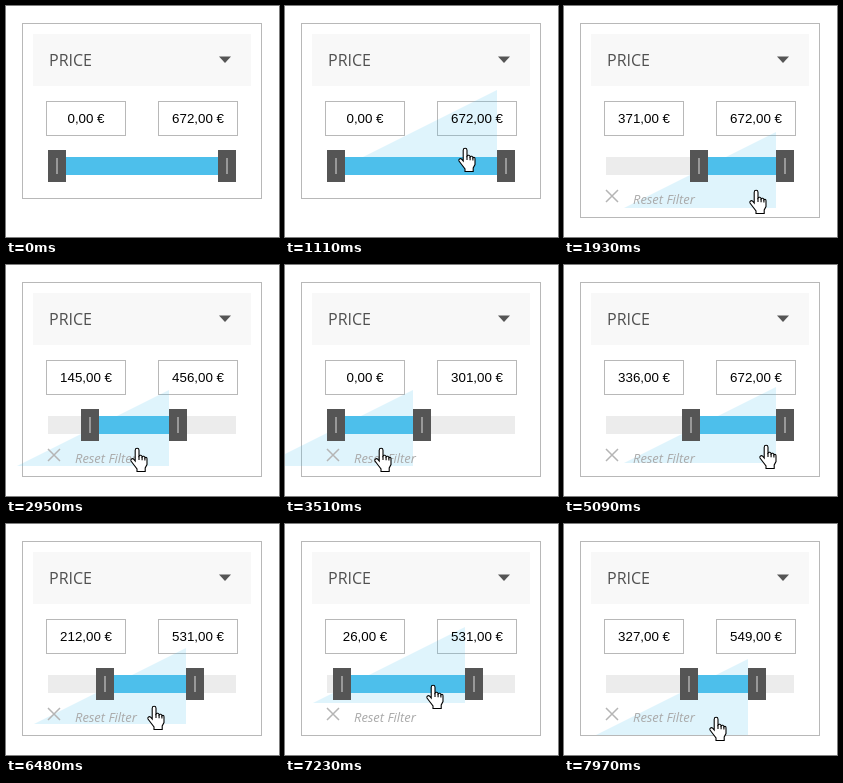
An HTML page with a canvas that plays this animation: 273x231 px, repeating every 8000 ms.

```html
<!DOCTYPE html>
<html lang="en">
<head>
<meta charset="utf-8">
<title>Price slider</title>
<style>
html, body { margin: 0; width: 100%; height: 100%; overflow: hidden; background: #fff; }
canvas { display: block; }
</style>
</head>
<body>
<canvas id="stage" width="273" height="231"></canvas>
<script>
const ctx = document.getElementById('stage').getContext('2d');
const LOOP = 8000, MAX_PRICE = 672;
const TRACK = { left: 42, right: 230, top: 151, bottom: 169 };
const HANDLE = 18, TRAVEL = 152;
const MAX_RIGHT = TRACK.right - HANDLE;
const HOVER_AT = 1010, DRAG_AT = 1290;
const START = { x: 168, y: 236 }, GRAB = { x: 180, y: 142 };

// Pointer moves: start, end, steps, target x, target y, easing power
const moves = [
  [270, 1010, 9, 177, 145, 1],
  [1110, 1110, 1, 180, 142, 1],
  [1290, 1930, 8, 192, 184, 1],
  [2310, 3050, 9, 120, 183, 1.4],
  [3150, 3510, 5, 96, 183, 0.8],
  [3890, 4610, 9, 162, 181, 1],
  [4710, 5090, 5, 202, 180, 1],
  [5360, 6120, 9, 158, 181, 1],
  [6200, 6480, 4, 148, 182, 1],
  [6850, 7230, 5, 148, 161, 1],
  [7510, 7970, 6, 152, 193, 1]
];

const hand = new Path2D('M-1.8 13V2.2a1.9 1.9 0 0 1 3.8 0V8a1.7 1.7 0 0 1 3.1 .8' +
  'a1.6 1.6 0 0 1 2.8 .9a1.3 1.3 0 0 1 2.1 1.2V16.5L8.2 20V23.5H0V21L-3 17L-6 13a1.6 1.6 0 0 1 2.6-1.8L-1.8 13Z');
const knuckles = new Path2D('M2 8V12M5.1 8.8V12.3M7.9 9.7V12.6');
const arrow = new Path2D('M.5 .5V16.5L4.2 13L6.7 18.5L9 17.5L6.6 12.2H11.8Z');

function pointerAt(time) {
  let { x, y } = START;
  for (const [start, end, steps, toX, toY, power] of moves) {
    if (time < start) break;
    const gap = (end - start) / Math.max(1, steps - 1);
    const step = gap ? Math.min(steps, Math.floor((time - start) / gap + 0.15) + 1) : 1;
    const p = (step / steps) ** power;
    x += (toX - x) * p;
    y += (toY - y) * p;
  }
  return { x: Math.round(x), y: Math.round(y) };
}

function rect(color, x, y, w, h) {
  ctx.fillStyle = color;
  ctx.fillRect(x, y, w, h);
}

function outline(x, y, w, h) {
  rect('#fff', x, y, w, h);
  ctx.strokeStyle = '#b8b8b8';
  ctx.lineWidth = 1;
  ctx.strokeRect(x + 0.5, y + 0.5, w - 1, h - 1);
}

function label(text, font, color, x, y, align = 'left') {
  ctx.font = font;
  ctx.fillStyle = color;
  ctx.textAlign = align;
  ctx.fillText(text, x, y);
}

function polygon(color, ...points) {
  ctx.beginPath();
  points.forEach(([x, y]) => ctx.lineTo(x, y));
  ctx.closePath();
  ctx.fillStyle = color;
  ctx.fill();
}

function drawHandle(x) {
  rect('#555', x, 144, HANDLE, 32);
  rect('#999', x + 8, 152, 2, 16);
}

function drawPrice(value, center) {
  label(value + ',00 €', '13.333px "Liberation Sans", Arial, sans-serif', '#000', center, 117, 'center');
}

function drawReset() {
  ctx.strokeStyle = '#b5b5b5';
  ctx.lineWidth = 1.5;
  ctx.stroke(new Path2D('M42 184L54 196M54 184L42 196'));
  label('Reset Filter', 'italic 13px "Open Sans", sans-serif', '#aaa', 69, 197.5);
}

function drawPointer({ x, y }) {
  const isHand = y < 176 || pointerDragging;
  ctx.save();
  ctx.translate(x, y);
  ctx.fillStyle = '#fff';
  ctx.strokeStyle = '#000';
  ctx.lineWidth = 1.1;
  ctx.fill(isHand ? hand : arrow);
  ctx.stroke(isHand ? hand : arrow);
  if (isHand) ctx.stroke(knuckles);
  ctx.restore();
}

let pointerDragging = false;

function draw(time) {
  const pointer = pointerAt(time);
  pointerDragging = time >= DRAG_AT;
  const anchor = pointerDragging ? pointer : GRAB;

  // The wedge's sloped side meets the track's lower edge at the left handle.
  const right = Math.min(MAX_RIGHT, anchor.x + 32);
  const base = anchor.y + 18;
  const span = Math.min(TRAVEL + HANDLE, TRAVEL - 2 * (base - TRACK.bottom));
  const filtered = base > TRACK.bottom || right < MAX_RIGHT;
  const left = filtered ? Math.max(TRACK.left, right - span) : TRACK.left;
  const scale = MAX_PRICE / TRAVEL;

  rect('#fff', 0, 0, 273, 231);
  outline(16, 17, 240, filtered ? 195 : 176);
  rect('#f8f8f8', 27, 28, 218, 52);
  label('PRICE', '16px "Open Sans", sans-serif', '#505050', 43, 60);
  polygon('#555', [213, 50.5], [225, 50.5], [219, 57]);
  outline(40, 95, 80, 35);
  outline(152, 95, 80, 35);

  if (time >= HOVER_AT) {
    polygon('rgba(77,191,235,.18)', [right - TRAVEL, base], [right, base - TRAVEL / 2], [right, base]);
  }

  drawPrice(Math.floor((left - TRACK.left) * scale), 80);
  drawPrice(Math.ceil(MAX_PRICE - (MAX_RIGHT - right) * scale), 192);
  if (filtered) drawReset();

  const height = TRACK.bottom - TRACK.top;
  rect('#ececec', TRACK.left, TRACK.top, TRACK.right - TRACK.left, height);
  rect('#4dbfeb', left, TRACK.top, right - left, height);
  drawHandle(left);
  drawHandle(right);
  if (time >= moves[0][0]) drawPointer(pointer);
}

const began = performance.now();
function tick() {
  draw((performance.now() - began) % LOOP);
  requestAnimationFrame(tick);
}
tick();
</script>
</body>
</html>
```
